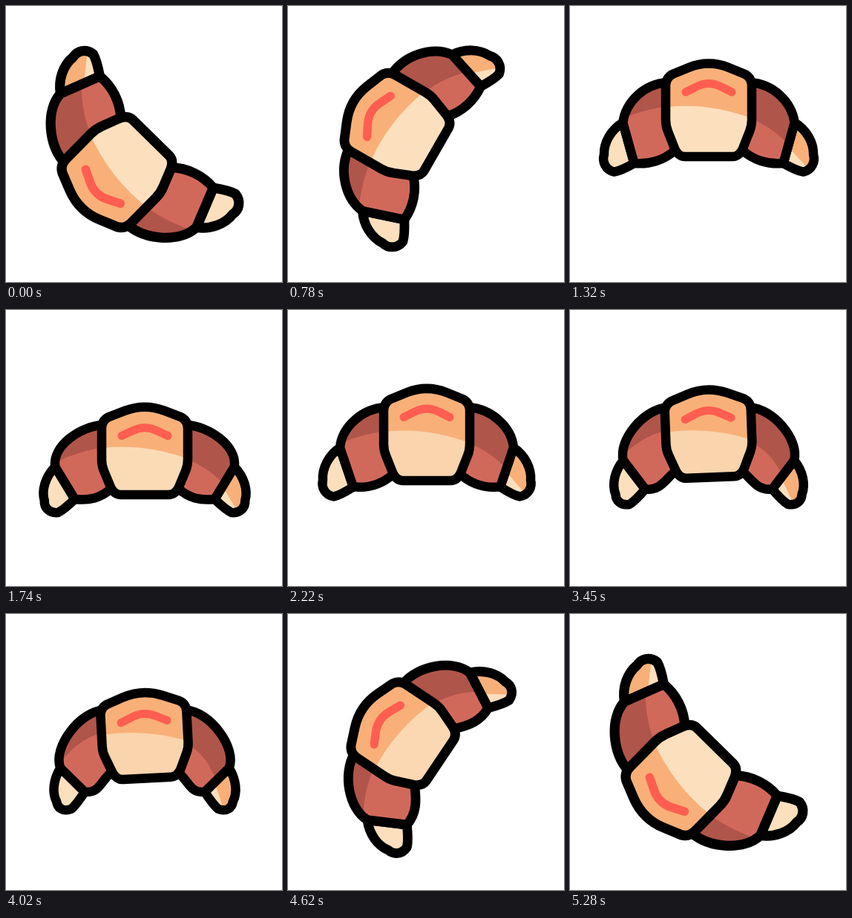
Write an HTML page that moves like this. It is 372x372 px and loops after 5.4 s.

```html
<!DOCTYPE html>
<html>
<head>
<meta charset="utf-8">
<style>
html, body { margin: 0; width: 100%; height: 100%; overflow: hidden; background: #fff; }
svg { display: block; width: 100vw; height: 100vh; }
.line { fill: none; stroke: #000; stroke-width: 12.5; stroke-linejoin: round; stroke-linecap: round; }
</style>
</head>
<body>
<svg viewBox="0 0 372 372">
  <defs>
    <clipPath id="clipBody"><path class="body"/></clipPath>
  </defs>
  <g id="all">
    <g id="limbs"></g>
    <g id="trunk">
      <path class="body" id="dough"/>
      <path id="crust" fill="#f8b078" clip-path="url(#clipBody)"/>
      <path id="shine" fill="none" stroke="#ff5e50" stroke-width="11" stroke-linecap="round" stroke-linejoin="round"/>
      <path class="body line"/>
    </g>
  </g>
</svg>
<script>
const LOOP = 5400, STEP = 30, TURN = -135.5, BASE = 23;
const $ = id => document.getElementById(id);

const BODY = 'M-58 -78 Q-58 -89 -49 -94 L-27 -103 Q0 -114 27 -103 L49 -94 Q58 -89 58 -78 ' +
  'L58 -33 Q58 -24 55 -17 L46 6 Q41 17 32 17 L-32 17 Q-41 17 -46 6 L-55 -17 Q-58 -24 -58 -33 Z';
const CRUST = 'M-64 -49 Q0 -58 64 -32 L64 -125 L-64 -125 Z';
const SHINE = 'M-31 -70 L-17 -77 Q0 -86 17 -77 L31 -70';
const TIP = 'M-29 0 C-24 18 -10 32 6 36 C14 41 26 40 32 29 C33 20 30 8 28 0 Z';
const TIP_CRUST = 'M-40 -9 L5 0 L28 38 L30 60 L-40 60 Z';

const mapPath = (d, fn) => d.replace(/(-?[\d.]+) (-?[\d.]+)/g,
  (m, x, y) => fn(+x, +y).map(n => n.toFixed(2)).join(' '));

const part = (t, a, b) => Math.max(0, Math.min(1, (t - a) / (b - a)));
const ease = (t, a, b) => (1 - Math.cos(Math.PI * part(t, a, b))) / 2;
const hop = (t, a, b) => Math.sin(Math.PI * part(t, a, b));

// Roll upright, sink twice, curl the arms in, roll back
function pose(t) {
  const lying = 1 - ease(t, 330, 1170) + ease(t, 4100, 5280);
  const dip = hop(t, 1380, 2400) + hop(t, 2400, 3540);
  const curl = ease(t, 3000, 3700) - ease(t, 4100, 4950);
  const squat = dip ** 3;
  return {
    rot: TURN * lying,
    scale: 1 + .06 * lying,
    lift: 51 * dip + 18 * curl * (1 - dip) - 6 * lying,
    squash: 1 - .08 * Math.min(1, squat + curl),
    lean: -3 * curl,
    fold: Math.min(30, 22 * squat + 30 * curl + 6 * lying),
    jx: 108 - squat - 11 * curl + 3 * lying,
    jy: -1 + 4 * squat + 21 * curl + 3 * lying,
    tone: ease(t, 1600, 1900) - ease(t, 4500, 4800)
  };
}

function makeLimb(side) {
  const id = side < 0 ? 'L' : 'R';
  $('limbs').insertAdjacentHTML('beforeend', `
    <g transform="scale(${side} 1)">
      <clipPath id="tip${id}"><path class="tip"/></clipPath>
      <clipPath id="arm${id}"><path class="arm"/></clipPath>
      <path class="tip" fill="#fcdfbd"/>
      <path class="tipCrust" fill="${side < 0 ? 'none' : '#f8b078'}" clip-path="url(#tip${id})"/>
      <path class="tip line"/>
      <path class="arm" fill="#d1695b"/>
      <path class="shade" fill="#b0554a" clip-path="url(#arm${id})"/>
      <path class="arm line"/>
    </g>`);
  return { side, g: $('limbs').lastElementChild };
}
const limbs = [makeLimb(-1), makeLimb(1)];

function setPath(root, cls, d) {
  root.querySelectorAll('.' + cls).forEach(el => el.setAttribute('d', d));
}

function drawLimb({ side, g }, { jx, jy, fold }, flat) {
  const a = (105.5 + fold) * Math.PI / 180, c = Math.cos(a), s = Math.sin(a);
  const k = 1 - fold * .0065;
  const place = (u, v) => [jx + u * k * c + v * s, jy + u * k * s - v * c];
  const A = place(-29, 0), B = place(28, 0);
  const Y = y => flat(0, y)[1];
  const arm = `M45 ${Y(-84)} L56 ${Y(-83)} C87 ${Y(-81)} ${A[0] - 4 + fold / 2} ${A[1] - 28} ${A}` +
    ` L${B} C${B[0] - 20} ${B[1] + 2} 60 ${Y(22)} 45 ${Y(8)} Z`;
  const edge = side < 0
    ? `M45 ${Y(-52)} Q85 ${Y(-48)} ${A[0] + 2} ${A[1] - 5} L150 ${A[1] - 5}`
    : `M45 ${Y(-38)} Q80 ${Y(-28)} ${jx} ${jy + 2} L150 ${jy}`;
  setPath(g, 'tip', mapPath(TIP, place));
  setPath(g, 'tipCrust', mapPath(TIP_CRUST, place));
  setPath(g, 'arm', arm);
  setPath(g, 'shade', edge + ' L150 -120 L45 -120 Z');
}

function draw(t) {
  const p = pose(t);
  const flat = (x, y) => [x, BASE + (y - BASE) * p.squash];
  const sag = 45 * (1 - p.squash);
  $('all').setAttribute('transform',
    `translate(187 186) rotate(${p.rot}) translate(0 ${p.lift}) scale(${p.scale})`);
  $('trunk').setAttribute('transform', `rotate(${p.lean} 0 -40)`);
  setPath(document, 'body', mapPath(BODY, flat));
  $('crust').setAttribute('d', mapPath(CRUST, flat));
  $('shine').setAttribute('d', mapPath(SHINE, (x, y) => [x, flat(x, y)[1] + sag]));
  $('dough').setAttribute('fill',
    `rgb(${252 - 2 * p.tone},${224 - 12 * p.tone},${190 - 18 * p.tone})`);
  limbs.forEach(l => drawLimb(l, p, flat));
}

const start = performance.now();
function tick() {
  const t = (performance.now() - start) % LOOP;
  draw(Math.floor(t / STEP) * STEP);
  requestAnimationFrame(tick);
}
tick();
</script>
</body>
</html>
```
